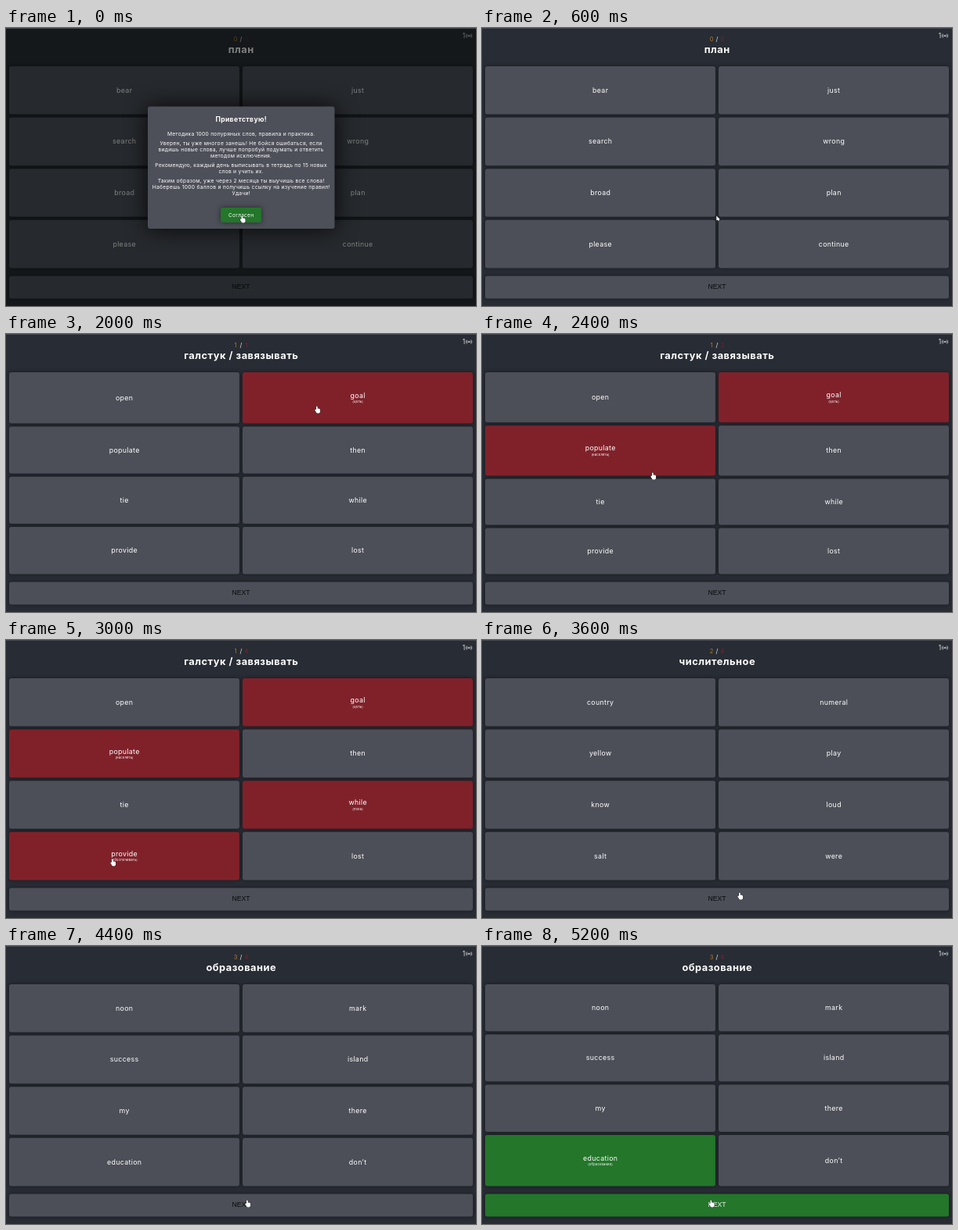
These frames come from a looping animation (600 px wide and 356 px high, 5400 ms). An HTML page with a canvas:

```html
<!DOCTYPE html>
<html lang="ru">
<head>
<meta charset="utf-8">
<title>Quiz</title>
<style>
  html, body { margin: 0; width: 100%; height: 100%; overflow: hidden; background: #282c34; }
  canvas { display: block; width: 600px; height: 356px; }
</style>
</head>
<body>
<canvas id="stage"></canvas>
<script>
const W = 600, H = 356, LOOP = 5400, STEP = 200, MODAL_END = 600;
const GRID = { top: 49, height: 246.4, gap: 4, extra: 5.2 };
const GREY = '#4c4f58', RED = '#80212a', GREEN = '#23762a';
const SANS = 'Inter, "Open Sans", sans-serif';
const ARIAL = '"Liberation Sans", Arial, sans-serif';

const canvas = document.getElementById('stage');
const ctx = canvas.getContext('2d');
const ratio = window.devicePixelRatio || 1;
canvas.width = W * ratio;
canvas.height = H * ratio;

// The pointer reaches a word at `reach` and presses it at `at`.
const click = (reach, at, word, meaning, x, y) => ({ reach, at, word, meaning, x, y });

// The last click of every question is the right answer; `next` is where the pointer then goes.
const questions = [
  { start: 0, title: 'план', next: [315, 329],
    words: 'bear just search wrong broad plan please continue'.split(' '),
    clicks: [click(800, 1000, 'plan', 'план', 380, 219)] },
  { start: 1400, title: 'галстук / завязывать', next: [457, 324],
    words: 'open goal populate then tie while provide lost'.split(' '),
    clicks: [
      click(1800, 2000, 'goal', 'цель', 394, 92),
      click(2200, 2400, 'populate', 'населять', 215, 177),
      click(2600, 2600, 'while', 'пока', 453, 208),
      click(2800, 3000, 'provide', 'обеспечивать', 133, 280),
      click(3200, 3200, 'tie', 'галстук / завязывать', 158, 196)
    ] },
  { start: 3600, title: 'числительное', next: [305, 325],
    words: 'country numeral yellow play know loud salt were'.split(' '),
    clicks: [click(3800, 4000, 'numeral', 'числительное', 376, 99)] },
  { start: 4400, title: 'образование', next: [289.5, 325],
    words: 'noon mark success island my there education don’t'.split(' '),
    clicks: [click(5000, 5000, 'education', 'образование', 192, 268)] }
];
questions.forEach(q => q.right = q.clicks.at(-1));

const stops = [
  { time: 0, x: 298.5, y: 240 },
  { time: 1600, x: 373, y: 152 },
  { time: 3600, x: 326, y: 323 },
  ...questions.flatMap(q => [
    ...q.clicks.map(({ reach, x, y }) => ({ time: reach, x, y })),
    { time: q.right.at + STEP, x: q.next[0], y: q.next[1] }
  ])
].sort((a, b) => a.time - b.time);

const paragraphs = [
  ['Методика 1000 попуряных слов, правила и практика.'],
  ['Уверен, ты уже многое занешь! Не бойся ошибаться, если',
    'видишь новые слова, лучше попробуй подумать и ответить',
    'методом исключения.'],
  ['Рекомендую, каждый день выписывать в тетрадь по 15 новых',
    'слов и учить их.'],
  ['Таким образом, уже через 2 месяца ты выучишь все слова!',
    'Наберешь 1000 баллов и получишь ссылку на изучение правил!',
    'Удачи!']
];

function text(str, x, y, size, color = '#fff', weight = 400, family = SANS) {
  const tracking = family === SANS ? size * 0.04 : 0;
  ctx.font = `${weight} ${size}px ${family}`;
  ctx.letterSpacing = `${tracking}px`;
  ctx.textAlign = 'center';
  ctx.fillStyle = color;
  ctx.fillText(str, x + tracking / 2, y + size * 0.34);
}

function box(x, y, w, h, color, blur = 5, shade = 0.45) {
  ctx.save();
  ctx.shadowColor = `rgba(0,0,0,${shade})`;
  ctx.shadowBlur = blur * ratio;
  ctx.fillStyle = color;
  ctx.beginPath();
  ctx.roundRect(x, y, w, h, 3);
  ctx.fill();
  ctx.restore();
}

function drawHeader(title, score, wrong) {
  text(score, 293, 14, 7.4, '#b57d2e');
  text('/', 300, 14, 8, '#e4e4e6');
  text(wrong, 307, 14, 7.4, '#84202a');
  text(title, 300, 28, 12.8, '#fff', 700);
}

function drawOnline() {
  text('1', 584.5, 10, 8.5, '#dcdde0');
  ctx.fillStyle = ctx.strokeStyle = '#c4c6ca';
  ctx.lineWidth = 0.8;
  ctx.beginPath();
  ctx.arc(591, 10, 1.1, 0, 7);
  ctx.fill();
  for (const r of [2.2, 3.7]) {
    for (const side of [0, Math.PI]) {
      ctx.beginPath();
      ctx.arc(591, 10, r, side - 0.75, side + 0.75);
      ctx.stroke();
    }
  }
}

// A row with an opened word is taller; all rows share the fixed grid height.
function drawGrid({ words, right }, done) {
  const opened = words.map(word => done.find(c => c.word === word));
  const tall = row => Boolean(opened[2 * row] || opened[2 * row + 1]);
  const rows = [0, 1, 2, 3];
  const base = (GRID.height - GRID.extra * rows.filter(tall).length) / rows.length;
  let y = GRID.top;
  for (const row of rows) {
    const h = base + (tall(row) ? GRID.extra : 0), mid = y + h / 2;
    for (const col of [0, 1]) {
      const i = 2 * row + col, x = 4 + 298 * col, hit = opened[i];
      box(x, y, 294, h, !hit ? GREY : hit === right ? GREEN : RED);
      text(words[i], x + 147, mid - (hit ? 2.8 : 0), 8.8);
      if (hit) text(`(${hit.meaning})`, x + 147, mid + 5.3, 4.2);
    }
    y += h + GRID.gap;
  }
  const solved = done.includes(right);
  box(4, 317.5, 592, 29, solved ? GREEN : GREY);
  text('NEXT', 300, 331.5, 8.7, solved ? '#f2f2f2' : '#090a0c', 400, ARIAL);
}

function drawModal() {
  ctx.fillStyle = 'rgba(1,5,3,.5)';
  ctx.fillRect(0, 1, W, H);
  box(181, 100.5, 238.5, 156.5, '#4d4f59', 28, 0.85);
  text('Приветствую!', 300, 117, 8.6, '#fff', 700);
  let y = 136;
  for (const lines of paragraphs) {
    lines.forEach((line, i) => text(line, 300, y + 8 * i, 6.7));
    y += 8 * lines.length + 4;
  }
  box(274, 230, 52, 19, GREEN, 6, 0.5);
  text('Согласен', 300, 239.5, 6.5);
}

function drawHand() {
  ctx.roundRect(2, 0.5, 1.7, 6, 0.8);
  ctx.roundRect(1.6, 3.4, 5.5, 6, 1.8);
  ctx.ellipse(1.8, 6.3, 1, 2, -0.6, 0, 7);
}

function drawArrow() {
  ctx.moveTo(0.8, 0.6);
  ctx.lineTo(0.8, 6.6);
  ctx.lineTo(2.3, 5.4);
  ctx.lineTo(3.4, 7.5);
  ctx.lineTo(5, 4.8);
  ctx.closePath();
}

function drawPointer(t) {
  const { x, y } = stops.findLast(s => s.time <= t);
  ctx.translate(x, y);
  ctx.beginPath();
  if (t === MODAL_END) drawArrow(); else drawHand();
  ctx.strokeStyle = '#16171b';
  ctx.lineWidth = 0.7;
  ctx.stroke();
  ctx.fillStyle = '#fff';
  ctx.fill();
}

function draw(t) {
  const score = questions.findLastIndex(q => q.start <= t);
  const question = questions[score];
  const done = questions.flatMap(q => q.clicks).filter(c => c.at <= t);
  const wrong = done.filter(c => !questions.some(q => q.right === c)).length;

  ctx.setTransform(ratio, 0, 0, ratio, 0, 0);
  ctx.fillStyle = '#282c34';
  ctx.fillRect(0, 0, W, H);
  drawHeader(question.title, score, wrong);
  drawOnline();
  drawGrid(question, done.filter(c => question.clicks.includes(c)));
  if (t < MODAL_END) drawModal();
  ctx.fillStyle = '#44474d';
  ctx.fillRect(0, 0, W, 1);
  drawPointer(t);
}

const begin = performance.now();
function tick() {
  const t = (performance.now() - begin) % LOOP;
  draw(Math.floor(t / STEP) * STEP);
  requestAnimationFrame(tick);
}
tick();
</script>
</body>
</html>
```
